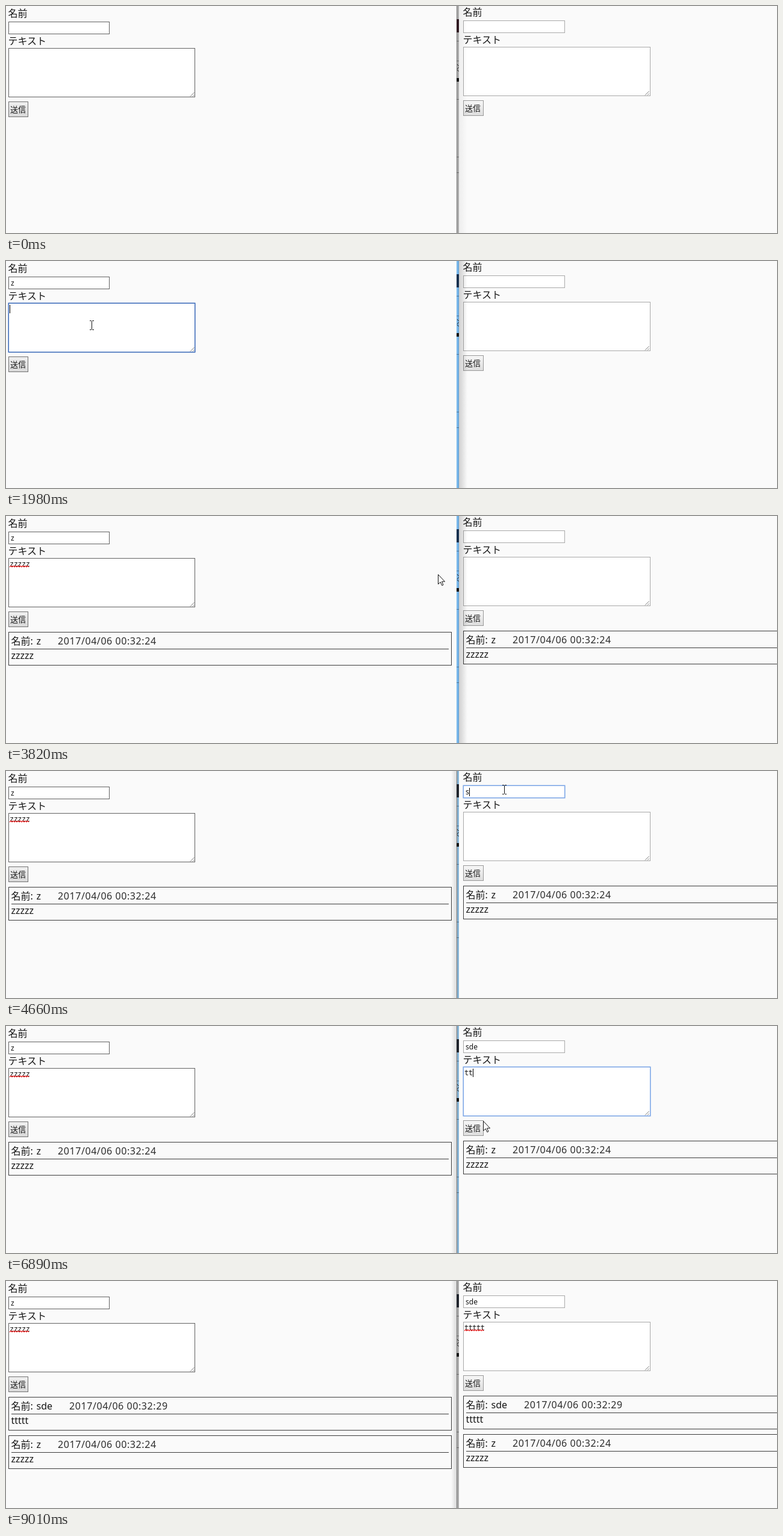
Write an HTML page that moves like this. It is 1280 by 378 pixels and loops after 9110 ms.

```html
<!DOCTYPE html>
<html lang="ja">
<head>
<meta charset="utf-8">
<title>Two-window chat form</title>
<style>
  html, body { margin: 0; width: 100%; height: 100%; overflow: hidden; background: #fafafa; }
  svg { display: block; width: 1280px; height: 378px; }
  text { font: 16px "Noto Sans", "Noto Sans CJK JP", "Noto Sans CJK", sans-serif; fill: #161616; white-space: pre; }
  .btn { font-size: 13px; }
  .in { font-size: 12px; }
  .area { font: 12px "Noto Sans Mono", monospace; letter-spacing: -.53px; }
  .date { letter-spacing: .57px; fill: #2c2c2c; }
  .crisp { shape-rendering: crispEdges; }
</style>
</head>
<body>
<svg id="stage" viewBox="0 0 1280 378" xmlns="http://www.w3.org/2000/svg"></svg>
<script>
const LOOP = 9110;
const stage = document.getElementById('stage');
const $ = id => document.getElementById(id);

const rect = (x, y, w, h, fill, extra = '') =>
  `<rect x="${x}" y="${y}" width="${w}" height="${h}" fill="${fill}" ${extra}/>`;
const frame = (x, y, w, h, fill, stroke, extra = '') =>
  rect(x + .5, y + .5, w - 1, h - 1, fill, `stroke="${stroke}" ${extra}`);
const text = (x, y, str, cls = '', id = '') =>
  `<text x="${x}" y="${y}" class="${cls}" id="${id}">${str}</text>`;
const ring = (id, x, y, w, h) =>
  rect(x + .25, y + .25, w - .5, h - .5, 'none', `id="${id}" stroke-width="1.5"`);
const gradient = (id, a, b, dir) =>
  `<linearGradient id="${id}" ${dir}>
    <stop stop-color="${a[0]}" stop-opacity="${a[1]}"/>
    <stop offset="1" stop-color="${b[0]}" stop-opacity="${b[1]}"/></linearGradient>`;

// Wavy spelling mark under five characters
const wave = 'M6 85' + 'l2 -2l2 2'.repeat(8);

function message(id, w, name, nameWidth, time, body) {
  return `<g id="${id}">` +
    frame(4, 193, w, 56, 'none', '#3c3c3c', 'class="crisp"') +
    rect(9, 221, w - 10, 1, '#3c3c3c') +
    text(8.5, 214, '名前:') + text(50.5, 214, name) +
    text(50.5 + nameWidth + 28, 214, `2017/04/06 00:32:${time}`, 'date') +
    text(8.5, 238, body) + '</g>';
}

function panel(p, x, y, extra, line, btnLine, msgWidth) {
  return `<g transform="translate(${x} ${y})">` +
    text(3.5, 18, '名前') + text(3.5, 64, 'テキスト') +
    frame(4, 26, 168 + extra, 21, '#fff', line, 'class="crisp"') +
    frame(4, 70, 310 + extra, 82, '#fff', line, 'class="crisp"') +
    `<path d="M306 150.500l6.500 -6.500M310 150.500l2.500 -2.500" stroke="#777" fill="none"/>` +
    ring(p + 'RingName', 4, 26, 168 + extra, 21) +
    ring(p + 'RingArea', 4, 70, 310 + extra, 82) +
    frame(4, 159, 33 + extra, 26, `url(#${p}Face)`, btnLine, `class="crisp" id="${p}Btn"`) +
    text(7, 177, '送信', 'btn') +
    text(8, 41, '', 'in', p + 'Name') + text(6, 83.5, '', 'area', p + 'Area') +
    `<path id="${p}Wave" d="${wave}" fill="none" stroke="#ea1414" stroke-width="1.2"/>` +
    rect(0, 0, 1, 14, '#000', `id="${p}Caret"`) +
    message(p + 'New', msgWidth, 'sde', 26.5, '29', 'ttttt') +
    message(p + 'Old', msgWidth, 'z', 7.5, '24', 'zzzzz') + '</g>';
}

stage.innerHTML = '<defs>' +
  gradient('lFace', ['#f0f0f0', 1], ['#d9d9d9', 1], 'x2="0" y2="1"') +
  gradient('rFace', ['#f7f7f7', 1], ['#dddddd', 1], 'x2="0" y2="1"') +
  gradient('fadeR', ['#000', .17], ['#000', 0], '') +
  gradient('fadeL', ['#000', 0], ['#000', .13], '') + '</defs>' +
  rect(0, 0, 1280, 378, '#fafafa') +
  panel('l', 0, 0, 0, '#626262', '#707070', 736) +
  panel('r', 755, -2, 1, '#a9a9a9', '#999', 740) +
  rect(752, 0, 14, 378, 'url(#fadeR)', 'id="shadeR"') +
  rect(739, 0, 9, 378, 'url(#fadeL)', 'id="shadeL"') +
  rect(748, 0, 4, 378, '#aaa', 'id="edge"') +
  rect(748, 0, 1, 378, '#777', 'id="edgeLine"') +
  rect(748, 22, 4, 22, '#301a22', 'id="edgeDark"') +
  rect(748, 120, 4, 6, '#111') +
  [58, 91, 155, 251, 277].map(y => rect(748, y, 4, 1, '#0005')).join('') +
  `<path d="M749 97l2.500 3M751.500 102l-2.500 3M749 106l2.500 3" stroke="#222" fill="none"/>` +
  `<g id="cursor">
    <path id="arrow" d="M.5 .5V16.500l3.700 -3.500 2.600 5.700 2.200 -1 -2.500 -5.500h5z" fill="#fff" stroke="#111"/>
    <path id="beam" d="M-3 -7.500h2.500l1 1 1 -1h2.500M.5 -6.500v13M-3 7.500h2.500l1 -1 1 1h2.500" fill="none" stroke="#111"/>
  </g>`;

// Pointer way points: time, x, y
const path = [
  [420, 981, 372], [620, 850, 240], [820, 430, 110], [1020, 130, 36], [1570, 130, 36],
  [1820, 142, 107], [2070, 142, 107], [2370, 42, 157], [2520, 42, 157],
  [2920, 28, 167], [3420, 28, 167], [3820, 717, 97], [4120, 828, 32], [4170, 827, 31],
  [4620, 827, 31], [5070, 932, 84], [5170, 932, 84], [5420, 902, 108], [5640, 902, 108],
  [5920, 822, 150], [6370, 822, 150], [6420, 819, 151], [6670, 819, 151],
  [6870, 792, 158], [7270, 784, 170], [7770, 784, 170], [8170, 1087, 258],
  [8320, 1087, 258], [8670, 1229, 370]
];

function pointer(t) {
  const q = Math.floor((t - 20) / 50) * 50 + 20;
  let i = 0;
  while (i < path.length - 2 && q >= path[i + 1][0]) i++;
  const [t0, x0, y0] = path[i], [t1, x1, y1] = path[i + 1];
  const k = Math.min(1, Math.max(0, (q - t0) / (t1 - t0)));
  return [Math.round(x0 + (x1 - x0) * k), Math.round(y0 + (y1 - y0) * k)];
}

const inside = ([x, y], l, t, r, b) => x >= l && x < r && y >= t && y < b;
const overField = p =>
  inside(p, 4, 26, 172, 47) || inside(p, 4, 70, 314, 152) ||
  inside(p, 759, 24, 928, 45) || inside(p, 759, 68, 1070, 151);

const typed = (str, t, start, gap) =>
  str.slice(0, t < start ? 0 : Math.floor((t - start) / gap) + 1);
const show = (id, on) => $(id).style.display = on ? '' : 'none';
const paint = (id, fill) => $(id).setAttribute('fill', fill);

function updatePanel(p, t, s) {
  const onName = t >= s.name && t < s.area, onArea = t >= s.area && t < s.send;
  show(p + 'RingName', onName);
  show(p + 'RingArea', onArea);
  $(p + 'RingName').setAttribute('stroke', s.blue);
  $(p + 'RingArea').setAttribute('stroke', s.blue);
  $(p + 'Name').textContent = s.nameText;
  $(p + 'Area').textContent = s.areaText;
  show(p + 'Caret', onName || onArea);
  const nameEnd = s.nameText ? $(p + 'Name').getComputedTextLength() : 0;
  $(p + 'Caret').setAttribute('x', onName ? Math.round(8 + nameEnd) : Math.round(6.4 + s.areaText.length * 6.67));
  $(p + 'Caret').setAttribute('y', onName ? 30 : 73);
  show(p + 'Wave', t >= s.send);
  show(p + 'Old', t >= 3430);
  show(p + 'New', t >= 7900);
  $(p + 'Old').setAttribute('transform', `translate(0 ${t >= 7900 ? 64 : 0})`);
}

function draw(t) {
  updatePanel('l', t, {
    name: 1190, area: 1840, send: 3280, blue: t < 2540 ? '#3667b8' : '#5b8ad8',
    nameText: typed('z', t, 1340, 100), areaText: typed('zzzzz', t, 2540, 90)
  });
  updatePanel('r', t, {
    name: 4480, area: 5540, send: 7760, blue: '#78a3e6',
    nameText: typed('sde', t, 4660, 140), areaText: typed('ttttt', t, 6710, 120)
  });

  const left = t >= 1190 && t < 4480, right = t >= 4480;
  const grey = !left && (!right || t >= 9010);
  paint('edge', left ? '#78b7ea' : grey ? '#ababab' : '#86b4d6');
  paint('edgeLine', left ? '#5d9bd0' : '#777');
  $('edgeLine').setAttribute('x', left ? 751 : 748);
  paint('edgeDark', left ? '#16304e' : right ? '#20242c' : '#301a22');
  $('shadeR').style.opacity = left ? 1 : right ? 0 : .3;
  show('shadeL', right);

  const p = pointer(t), beam = overField(p);
  show('cursor', t >= 450 && t < 8700);
  show('beam', beam);
  show('arrow', !beam);
  $('cursor').setAttribute('transform', `translate(${p[0]} ${p[1]})`);

  const hotL = inside(p, 4, 159, 37, 185), hotR = inside(p, 759, 157, 792, 183);
  paint('lBtn', !hotL ? 'url(#lFace)' : t >= 3280 && t < 3380 ? '#7fdcf2' : '#a4f2fc');
  $('lBtn').setAttribute('stroke', hotL ? '#2c9fd2' : '#707070');
  paint('rBtn', hotR && t >= 7760 && t < 7860 ? '#dcdcdc' : 'url(#rFace)');
  $('rBtn').setAttribute('stroke', hotR ? '#777' : '#999');
}

const start = performance.now();
(function tick() {
  draw((performance.now() - start) % LOOP);
  requestAnimationFrame(tick);
})();
</script>
</body>
</html>
```
